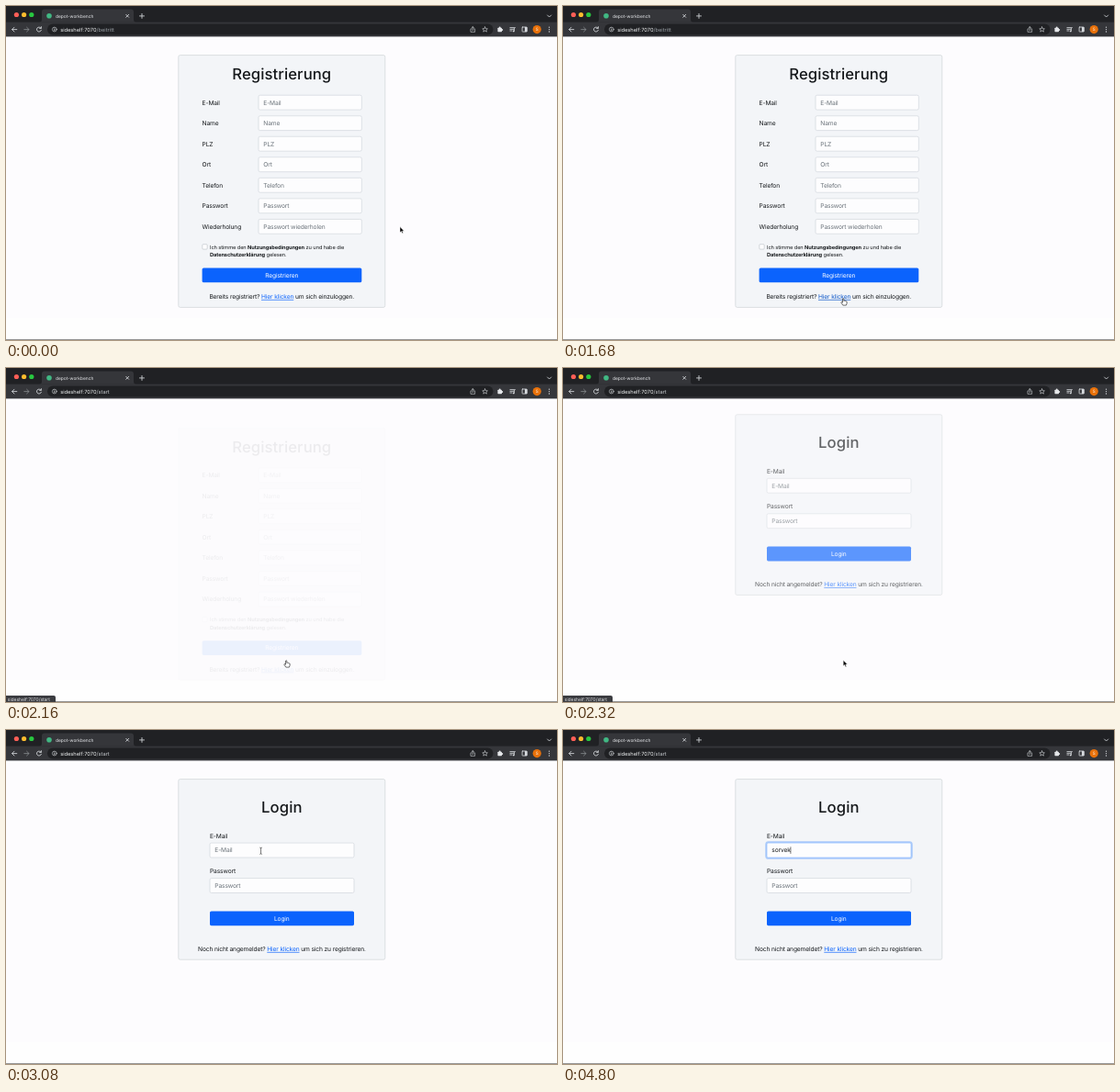
An HTML page for the animation above (5000 ms loop, 600 px wide and 364 px high).

```html
<!DOCTYPE html>
<html lang="de">
<head>
<meta charset="utf-8">
<title>Anmeldung</title>
<style>
  html, body { margin: 0; width: 100%; height: 100%; overflow: hidden; background: #fdfcfe; }
  svg { display: block; width: 600px; height: 364px; }
  text {
    font: 400 6.67px Inter, "Open Sans", sans-serif;
    letter-spacing: -.02em; fill: #15181b;
    text-rendering: geometricPrecision; white-space: pre;
  }
  .title { font-size: 16.67px; font-weight: 500; letter-spacing: .005em; }
  .small { font-size: 5.67px; letter-spacing: -.015em; }
  .bold { font-weight: 700; }
  .hint { fill: #6a7279; }
  .on { fill: #fff; }
  .mid { text-anchor: middle; }
  .link { fill: #0b63fd; text-decoration: underline; }
  .link.hover { fill: #0a55c8; }
  .card { fill: #f3f5f8; stroke: #d0d4d7; stroke-width: .7; }
  .field { fill: #fdfdfe; stroke: #cbd1d7; stroke-width: .6; }
  .btn { fill: #0b63fd; }
  .btn.hover { fill: #0b58dc; }
  .tab { font-size: 4.9px; letter-spacing: 0; fill: #e8eaed; }
  .url { font-size: 5.7px; letter-spacing: 0; fill: #f1f3f4; }
  .path { fill: #9aa0a6; }
  .status { font-size: 5px; letter-spacing: -.01em; fill: #dfe1e4; }
  .icon { fill: none; stroke: #d5d8dc; stroke-width: .85; stroke-linecap: round; stroke-linejoin: round; }
</style>
</head>
<body>
<svg id="stage" viewBox="0 0 600 364"></svg>
<script>
const LOOP = 5000, STEP = 40;
const HOST = 'sideshelf:7070';
const NAME = 'sorvek';
const KEY_TIMES = [3720, 4000, 4280, 4560, 4720, 4800];

const rect = (x, y, w, h, r, attrs = '') =>
  `<rect x="${x}" y="${y}" width="${w}" height="${h}" rx="${r}" ${attrs}/>`;
const circle = (x, y, r, attrs) => `<circle cx="${x}" cy="${y}" r="${r}" ${attrs}/>`;
const text = (x, y, str, cls = '', id = '') =>
  `<text x="${x}" y="${y}" class="${cls}" id="${id}">${str}</text>`;
const icon = (d, attrs = '') => `<path class="icon" d="${d}" ${attrs}/>`;

function field(x, y, w, hint, id = '') {
  return rect(x, y, w, 15.9, 1.6, `class="field" id="${id}"`) +
    text(x + 5.3, y + 10.35, hint, 'hint', id && id + 'Text');
}

function button(x, y, w, label, id) {
  return rect(x, y, w, 15.8, 1.6, `class="btn" id="${id}"`) +
    text(300.3, y + 10.3, label, 'on mid');
}

function browserBar() {
  const lights = ['#ff5f57', '#febc2e', '#28c840']
    .map((c, i) => circle(11.4 + i * 8.2, 9.5, 2.6, `fill="${c}"`)).join('');
  const dots = [-2.4, 0, 2.4].map(d => circle(591.5, 25.6 + d, .65, 'fill="#d5d8dc"')).join('');
  return rect(0, 0, 600, 18.5, 0, 'fill="#202124"') +
    rect(0, 17.6, 600, 15.8, 0, 'fill="#35363a"') +
    '<path d="M36 17.7Q39 17.7 39 14.7V6.4Q39 3.4 42 3.4H136Q139 3.4 139 6.4V14.7Q139 17.7 142 17.7Z" fill="#35363a"/>' +
    lights +
    circle(47, 10.8, 2.8, 'fill="#41b883"') +
    text(54, 12.6, 'depot-workbench', 'tab') +
    icon('M130.7 9.3l3 3m0-3l-3 3M148 8.4v5m-2.5-2.5h5M589.6 10l2 2 2-2') +
    icon('M11.8 25.6H6.6m2.4-2.4l-2.4 2.4 2.4 2.4') +
    icon('M19.8 25.6H25m-2.4-2.4l2.4 2.4-2.4 2.4', 'style="stroke:#85888c"') +
    icon('M38 24a2.5 2.5 0 1 0 .4 2.3M38.4 22.6v1.8h-1.8') +
    rect(45, 19.6, 485.5, 12, 6, 'fill="#202124"') +
    icon('M52.8 25.4v1.3M52.8 24v.1') + circle(52.8, 25.5, 2.4, 'class="icon" style="stroke-width:.6"') +
    '<text x="59.2" y="27.6" class="url">' + HOST + '<tspan class="path" id="route"></tspan></text>' +
    icon('M507 24.9h-1v3.4h4.6v-3.4h-1M508.3 26.6v-4m-1.2 1.2l1.2-1.2 1.2 1.2', 'style="stroke-width:.6"') +
    icon('M521.6 22.8l.8 1.8 2 .2-1.5 1.3.5 2-1.8-1.1-1.8 1.1.5-2-1.5-1.3 2-.2z', 'style="stroke-width:.6"') +
    rect(535.4, 23.7, 4.6, 4.5, .6, 'fill="#e3e5e8"') +
    circle(537.7, 23.5, 1, 'fill="#e3e5e8"') + circle(540.2, 25.9, 1, 'fill="#e3e5e8"') +
    icon('M548.9 23.6h4M548.9 25.3h4M548.9 27h2M553.4 27.2v-3.6h1') + circle(552.7, 27.4, .9, 'fill="#d5d8dc"') +
    rect(562.1, 23, 5.2, 5, .5, 'class="icon"') + rect(564.9, 23, 2.4, 5, 0, 'fill="#d5d8dc"') +
    circle(578.2, 25.6, 4.6, 'fill="#e8710a"') +
    '<text x="578.2" y="27.3" class="mid on" style="font-size:4.6px">S</text>' + dots;
}

function registerPage() {
  const rows = ['E-Mail', 'Name', 'PLZ', 'Ort', 'Telefon', 'Passwort', 'Wiederholung'];
  const form = rows.map((label, i) => {
    const y = 97.2 + 22.53 * i;
    const hint = i === 6 ? 'Passwort wiederholen' : label;
    return text(213.6, y + 10.4, label) + field(275, y, 112.3, hint);
  }).join('');
  return '<g id="register">' +
    rect(187.8, 53.6, 225, 274.8, 1.8, 'class="card"') +
    text(300.3, 80, 'Registrierung', 'title mid') + form +
    rect(213.8, 259.7, 5.4, 5.4, 1, 'class="field" style="stroke:#b9bfc5"') +
    text(222, 264.6, 'Ich stimme den <tspan class="bold">Nutzungsbedingungen</tspan> zu und habe die', 'small') +
    text(222, 273.1, '<tspan class="bold">Datenschutzerklärung</tspan> gelesen.', 'small') +
    button(213.6, 285.5, 173.7, 'Registrieren', 'registerBtn') +
    text(300.3, 318.9, 'Bereits registriert? <tspan class="link" id="link">Hier klicken</tspan> um sich einzuloggen.', 'mid') +
    '</g>';
}

function loginPage() {
  return '<g id="login">' +
    rect(187.8, 53.6, 225, 196.6, 1.8, 'class="card"') +
    text(300.3, 90, 'Login', 'title mid') +
    text(222, 117.6, 'E-Mail') +
    rect(221.2, 122.3, 158.6, 17.5, 2.4, 'id="ring" fill="none" stroke="#0d6efd" stroke-opacity=".3" stroke-width="1.9"') +
    field(222, 123.1, 157, 'E-Mail', 'mail') +
    rect(0, 127.3, .55, 7.6, 0, 'id="caret" fill="#111"') +
    text(222, 156, 'Passwort') + field(222, 161.6, 157, 'Passwort') +
    button(222, 197.4, 157, 'Login', 'loginBtn') +
    text(300.4, 240.9, 'Noch nicht angemeldet? <tspan class="link">Hier klicken</tspan> um sich zu registrieren.', 'mid') +
    '</g>';
}

// Pointer shapes, each with its hot spot at 0,0.
const pointers =
  '<path id="arrow" d="M0 0V6.3L1.45 5 2.45 7.2 3.5 6.75 2.55 4.6H4.5Z" fill="#000" stroke="#fff" stroke-width=".5"/>' +
  '<path id="hand" d="M-.7 .6Q0-.5 .6 .6V2.9Q1.3 2.3 1.8 3.1 2.6 2.6 3 3.4 3.9 3.1 3.9 4V5.6L3.2 7.6H-.4L-2.3 4.8Q-2.4 3.7-1.4 4.1L-.7 4.7Z" fill="#fff" stroke="#111" stroke-width=".6"/>' +
  '<path id="beam" d="M-1.2-3.6Q0-3.6 0-2.8 0-3.6 1.2-3.6M0-2.8V2.8M-1.2 3.6Q0 3.6 0 2.8 0 3.6 1.2 3.6" fill="none" stroke="#222" stroke-width=".6"/>';

const stage = document.getElementById('stage');
stage.innerHTML =
  rect(0, 0, 600, 364, 0, 'fill="#fdfcfe"') +
  rect(0, 340, 600, 24, 0, 'fill="#fefefe"') +
  registerPage() + loginPage() + browserBar() +
  rect(0, 363.4, 600, .6, 0, 'fill="#555"') +
  '<g id="status"><path d="M0 357H52Q54 357 54 359V364H0Z" fill="#3b3c40"/>' +
  text(1.8, 362.5, HOST + '/start', 'status') + '</g>' +
  '<g id="pointer">' + pointers + '</g>';

const el = id => document.getElementById(id);
const show = (id, on) => { el(id).style.display = on ? '' : 'none'; };
const span = (t, from, to) => Math.min(1, Math.max(0, (t - from) / (to - from)));
const smooth = p => p * p * (3 - 2 * p);

// CSS timing curve, solved by bisection.
function bezier(x1, y1, x2, y2) {
  const at = (a, b, s) => 3 * (1 - s) ** 2 * s * a + 3 * (1 - s) * s * s * b + s ** 3;
  return x => {
    let lo = 0, hi = 1;
    for (let i = 0; i < 24; i++) {
      const m = (lo + hi) / 2;
      if (at(x1, x2, m) < x) lo = m; else hi = m;
    }
    return at(y1, y2, lo);
  };
}
const easeIn = bezier(.42, 0, 1, 1);
const easeOut = bezier(0, 0, .58, 1);

// Pointer moves: start, end, from, bend, to.
const moves = [
  [580, 1120, [429, 240.6], [395, 300], [322, 330]],
  [1140, 1500, [322, 330], [310, 325], [305.2, 318.5]],
  [2520, 3100, [305.2, 318.5], [284, 235], [277.5, 131]]
];

function pointerAt(t) {
  let move = moves[0];
  for (const m of moves) if (t >= m[0]) move = m;
  const [start, end, a, b, c] = move;
  const p = smooth(span(t, start, end)), q = 1 - p;
  return [0, 1].map(i => q * q * a[i] + 2 * q * p * b[i] + p * p * c[i]);
}

const inside = ([x, y], l, t, r, b) => x >= l && x <= r && y >= t && y <= b;

function setPage(id, opacity, shift) {
  const g = el(id);
  show(id, opacity > 0);
  g.setAttribute('opacity', opacity);
  g.setAttribute('transform', `translate(0 ${shift})`);
}

function draw(t) {
  const leave = easeIn(span(t, 1872, 2172));
  const enter = easeOut(span(t, 2176, 2476));
  setPage('register', 1 - leave, 12.5 * leave);
  setPage('login', enter, -8.33 * (1 - enter));

  el('route').textContent = t < 1840 ? '/beitritt' : '/start';
  el('route').style.fill = t < 1840 ? '' : '#c4c8cc';
  show('status', t >= 1760 && t < 2600);

  const focus = smooth(span(t, 3380, 3530));
  el('ring').setAttribute('opacity', focus);
  el('mail').style.stroke = focus > .5 ? '#86b7fe' : '';
  const typed = NAME.slice(0, KEY_TIMES.filter(k => t >= k).length);
  const mail = el('mailText');
  mail.textContent = typed || 'E-Mail';
  mail.setAttribute('class', typed ? '' : 'hint');
  el('caret').setAttribute('x', 227.2 + (typed ? mail.getComputedTextLength() : 0));
  show('caret', focus > 0);

  const pos = pointerAt(t), first = t < 2176;
  const onLink = first && inside(pos, 278, 312, 314, 322);
  const onRegister = first && inside(pos, 213, 285, 388, 302);
  const onLogin = !first && inside(pos, 222, 197, 379, 214);
  const onField = !first && (inside(pos, 222, 123, 379, 139) || inside(pos, 222, 161, 379, 178));
  const hand = onLink || onRegister || onLogin;
  el('link').classList.toggle('hover', onLink);
  el('registerBtn').classList.toggle('hover', onRegister);
  el('loginBtn').classList.toggle('hover', onLogin);
  show('hand', hand);
  show('beam', onField);
  show('arrow', !hand && !onField);
  show('pointer', t < KEY_TIMES[0]);
  el('pointer').setAttribute('transform', `translate(${pos})`);
}

const begin = performance.now();
function tick() {
  const t = (performance.now() - begin) % LOOP;
  draw(Math.floor(t / STEP) * STEP);
  requestAnimationFrame(tick);
}
tick();
</script>
</body>
</html>
```
